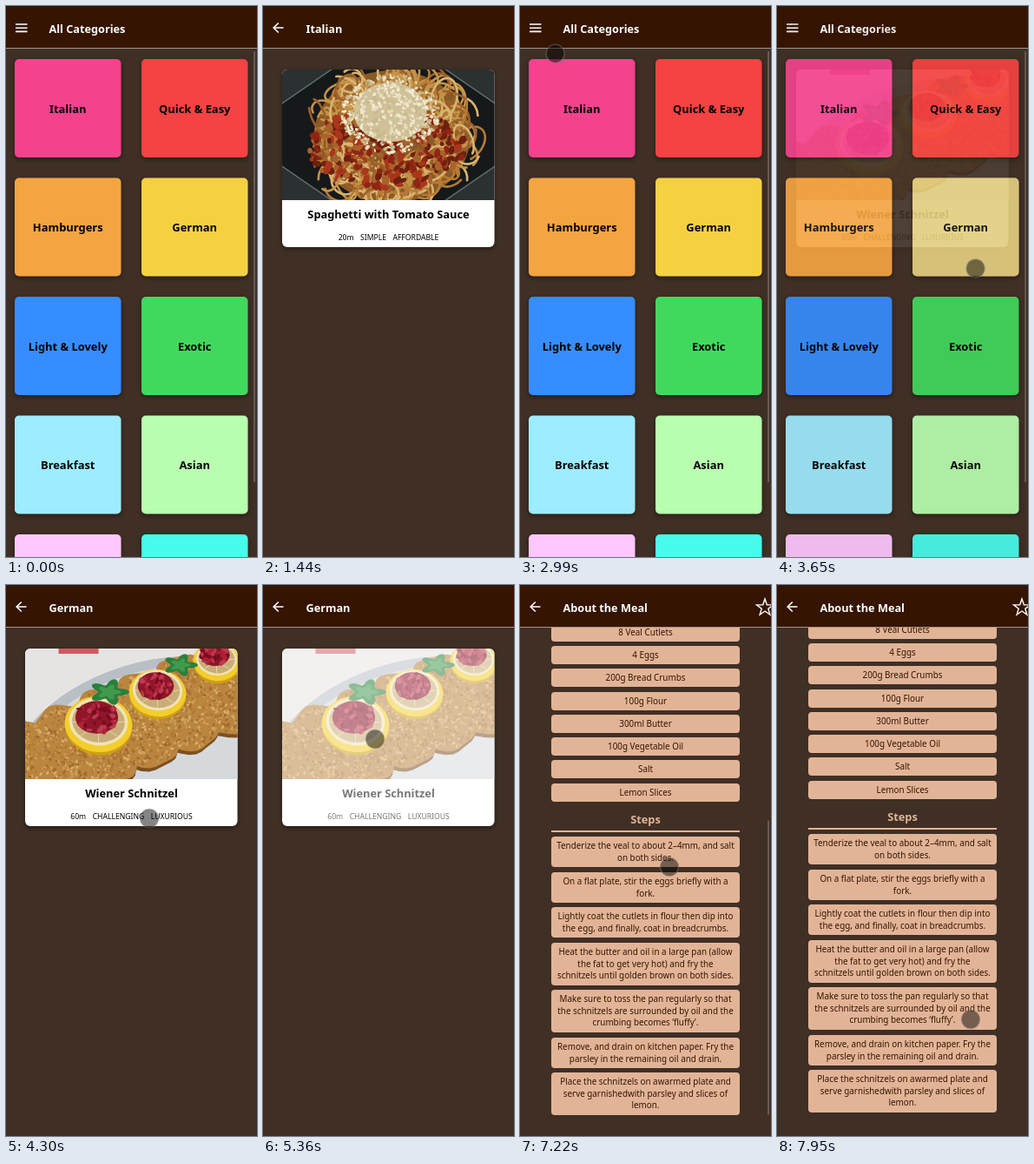
These frames come from a looping animation (289x633 px, 8 s). An HTML page with a canvas:

```html
<!DOCTYPE html>
<html lang="en">
<head>
<meta charset="utf-8">
<title>Recipe app walkthrough</title>
<style>
html, body { margin: 0; width: 100%; height: 100%; overflow: hidden; background: #3f2f25; }
canvas { display: block; width: 289px; height: 633px; }
</style>
</head>
<body>
<canvas id="stage" width="289" height="633"></canvas>
<script>
const W = 289, H = 633, MID = W / 2, LOOP = 8000, FADE = 270;
const HEADER = 49, VIEW = 561, SCROLL_END = 371;
const BG = '#3f2f25', DARK = '#351401', PEACH = '#e2b497';
const FAMILY = '"Noto Sans", "Open Sans", sans-serif';

const makeCanvas = (width, height) => Object.assign(document.createElement('canvas'), { width, height });
const stage = document.getElementById('stage').getContext('2d');
const layer = makeCanvas(W, H).getContext('2d');

const CATEGORIES = [
  ['Italian', '#f5428d'], ['Quick & Easy', '#f54242'],
  ['Hamburgers', '#f5a442'], ['German', '#f5d142'],
  ['Light & Lovely', '#368dff'], ['Exotic', '#41d95d'],
  ['Breakfast', '#9eecff'], ['Asian', '#b9ffb0'],
  ['French', '#ffc7ff'], ['Summer', '#47fced']
];
const SCHNITZEL_INFO = ['60m', 'CHALLENGING', 'LUXURIOUS'];
const INGREDIENTS = ['8 Veal Cutlets', '4 Eggs', '200g Bread Crumbs', '100g Flour',
  '300ml Butter', '100g Vegetable Oil', 'Salt', 'Lemon Slices'];
const STEPS = [
  ['Tenderize the veal to about 2–4mm, and salt', 'on both sides.'],
  ['On a flat plate, stir the eggs briefly with a', 'fork.'],
  ['Lightly coat the cutlets in flour then dip into', 'the egg, and finally, coat in breadcrumbs.'],
  ['Heat the butter and oil in a large pan (allow', 'the fat to get very hot) and fry the', 'schnitzels until golden brown on both sides.'],
  ['Make sure to toss the pan regularly so that', 'the schnitzels are surrounded by oil and the', 'crumbing becomes ‘fluffy’.'],
  ['Remove, and drain on kitchen paper. Fry the', 'parsley in the remaining oil and drain.'],
  ['Place the schnitzels on awarmed plate and', 'serve garnishedwith parsley and slices of', 'lemon.']
];

const ROUTE = [
  { at: 0, to: 'home' }, { at: 1100, to: 'italian' }, { at: 2650, to: 'home' },
  { at: 3640, to: 'german' }, { at: 5470, to: 'detail' }
];
// The pointer eases from stop to stop.
const STOPS = [
  { at: 70, x: 277, y: 407 }, { at: 600, x: 30, y: 39 }, { at: 850, x: 70, y: 118 },
  { at: 1640, x: 70, y: 118 }, { at: 1950, x: 189, y: 260 }, { at: 2500, x: 18, y: 26 },
  { at: 2880, x: 18, y: 26 }, { at: 3420, x: 225, y: 288 }, { at: 4150, x: 240, y: 345 },
  { at: 4300, x: 165, y: 268 }, { at: 4620, x: 129, y: 177 }, { at: 5850, x: 129, y: 177 },
  { at: 6330, x: 172, y: 554 }, { at: 6640, x: 172, y: 476 }, { at: 7280, x: 172, y: 320 },
  { at: 7730, x: 172, y: 320 }, { at: 7950, x: 223, y: 499 }
];
// While the page is flung, the picture only refreshes at these times.
const REFRESHES = [6640, 6760, 6890, 7220, 7280];

const clamp = v => Math.max(0, Math.min(1, v));
const progress = (t, from, to) => clamp((t - from) / (to - from));
const smooth = p => p * p * (3 - 2 * p);
const easeOut = p => 1 - (1 - p) ** 2;
const between = (t, a, b) => t >= a && t < b;

const scrollAt = t =>
  78 * smooth(progress(t, 6330, 6640)) + (SCROLL_END - 78) * easeOut(progress(t, 6640, 7280));

function seeded(seed) {
  return () => (seed = (seed * 16807) % 2147483647) / 2147483647;
}

function text(c, str, x, y, size, weight = 400, color = '#000', align = 'center') {
  c.font = `${weight} ${size}px ${FAMILY}`;
  c.fillStyle = color;
  c.textAlign = align;
  c.fillText(str, x, y);
}

function box(c, x, y, w, h, r, color) {
  c.beginPath();
  c.roundRect(x, y, w, h, r);
  c.fillStyle = color;
  c.fill();
}

function raisedBox(c, ...args) {
  c.save();
  c.shadowColor = 'rgba(0,0,0,.4)';
  c.shadowBlur = 5;
  c.shadowOffsetY = 2;
  box(c, ...args);
  c.restore();
}

function oval(c, x, y, rx, ry, color, turn = 0) {
  c.beginPath();
  c.ellipse(x, y, rx, ry, turn, 0, Math.PI * 2);
  c.fillStyle = color;
  c.fill();
}

// Closed outline with the radius given by a function of the angle
function outline(c, x, y, rx, ry, count, radius, turn = 0) {
  c.beginPath();
  for (let i = 0; i < count; i++) {
    const a = turn + i / count * Math.PI * 2, r = radius(a, i);
    c.lineTo(x + Math.cos(a) * rx * r, y + Math.sin(a) * ry * r);
  }
  c.closePath();
}

function speckle(c, rand, count, x, y, rx, ry, size, colors) {
  for (let i = 0; i < count; i++) {
    const a = rand() * 6.283, d = Math.sqrt(rand());
    oval(c, x + Math.cos(a) * rx * d, y + Math.sin(a) * ry * d,
      size * (.5 + rand()), size * (.4 + rand() * .6), colors[i % colors.length], rand() * 3);
  }
}

// Food pictures are drawn around their centre.
function pasta(c) {
  const rand = seeded(71);
  c.fillStyle = '#2b3032';
  c.fillRect(-125, -85, 250, 170);
  outline(c, 0, 0, 134, 92, 8, () => 1, Math.PI / 8);
  c.fillStyle = '#15191b';
  c.fill();
  c.strokeStyle = '#626b6c';
  c.lineWidth = 1.5;
  c.stroke();
  oval(c, 4, 2, 90, 76, '#8a5a26');
  c.lineCap = 'round';
  for (let i = 0; i < 210; i++) {
    const a = rand() * 6.283, d = .5 + rand() * .5;
    c.beginPath();
    c.ellipse(4 + Math.cos(a) * 92 * d, 2 + Math.sin(a) * 78 * d,
      9 + rand() * 15, 6 + rand() * 12, rand() * 3, rand() * 5, 5 + rand() * 4);
    c.strokeStyle = ['#c59347', '#d9b470', '#9b602b', '#b87b35'][i % 4];
    c.lineWidth = 2.6;
    c.stroke();
  }
  speckle(c, rand, 330, -2, 16, 90, 46, 4.5, ['#8f2412', '#a9361b', '#6d2010', '#a8622c']);
  oval(c, 2, -26, 42, 34, '#d0c198');
  speckle(c, rand, 420, 2, -24, 56, 45, 2.2, ['#e6dcbd', '#c9b98c', '#f1ead2']);
}

function parsley(c, x, y, size) {
  for (const [scale, color] of [[1, '#28803c'], [.6, '#409a4b']]) {
    outline(c, x, y, size * scale, size * .65 * scale, 40, a => .78 + .25 * Math.cos(5 * a));
    c.fillStyle = color;
    c.fill();
  }
}

function lemon(c, rand, x, y, r) {
  oval(c, x, y + 2, r, r * .86, '#cfa010', .1);
  oval(c, x, y, r, r * .82, '#f3cd2d', .1);
  oval(c, x, y - 3, r * .87, r * .7, '#efe3ba', .1);
  oval(c, x, y - 3, r * .78, r * .61, '#c9ad78', .1);
  for (let a = 0; a < 6.28; a += .785) {
    c.beginPath();
    c.moveTo(x, y);
    c.lineTo(x + Math.cos(a) * r * .78, y - 3 + Math.sin(a) * r * .6);
    c.strokeStyle = '#e6d3a0';
    c.lineWidth = 1;
    c.stroke();
  }
  oval(c, x - 2, y - 8, r * .63, r * .48, '#8f162a');
  speckle(c, rand, 45, x - 2, y - 8, r * .6, r * .46, 3, ['#b02038', '#780d20', '#bd3a4e']);
}

function schnitzel(c) {
  const rand = seeded(29);
  c.fillStyle = '#e6e4e3';
  c.fillRect(-125, -85, 250, 170);
  c.fillStyle = '#cf5962';
  c.fillRect(-84, -85, 46, 16);
  oval(c, 20, 40, 165, 99, '#b9bfc6', -.3);
  oval(c, 24, 43, 157, 92, '#d6d9dc', -.3);
  for (let i = 4; i >= 0; i--) {
    const x = -98 + i * 46, y = 54 - i * 19;
    c.save();
    c.translate(x, y);
    c.rotate(.5);
    outline(c, 1, 4, 64, 38, 40, a => 1 + .03 * Math.sin(7 * a + i));
    c.fillStyle = '#7d5022';
    c.fill();
    outline(c, 0, 0, 64, 38, 40, a => 1 + .03 * Math.sin(7 * a + i));
    c.fillStyle = '#b9853f';
    c.fill();
    speckle(c, rand, 420, 0, 0, 61, 35, 1.8, ['#cb9c54', '#a26a2e', '#d6ab68', '#b07636']);
    c.restore();
  }
  for (let i = 2; i >= 0; i--) lemon(c, rand, -38 + i * 68, 12 - i * 36, 39 - i * 6);
  parsley(c, -26, -25, 23);
  parsley(c, 56, -56, 20);
}

function picture(draw, w, h, scale) {
  const canvas = makeCanvas(w, h), c = canvas.getContext('2d');
  c.translate(w / 2, h / 2);
  c.scale(scale, scale);
  draw(c);
  return canvas;
}
const pastaCard = picture(pasta, 245, 150, 1);
const schnitzelCard = picture(schnitzel, 245, 150, 1);
const schnitzelLarge = picture(schnitzel, W, 266, 1.66);

function header(c, title, icon) {
  c.fillStyle = DARK;
  c.fillRect(0, 0, W, 48);
  c.fillStyle = '#241d19';
  c.fillRect(0, 0, W, 1);
  c.fillStyle = '#a5948c';
  c.fillRect(0, 48, W, 1);
  text(c, title, 49.5, 31, 12.7, 600, '#fff', 'left');
  c.strokeStyle = '#fff';
  c.lineWidth = 1.6;
  c.beginPath();
  if (icon === 'menu') {
    for (let y = 21; y < 30; y += 4.2) { c.moveTo(11, y); c.lineTo(24.5, y); }
  } else {
    c.moveTo(23.5, 25); c.lineTo(12.5, 25);
    c.moveTo(17.8, 19.5); c.lineTo(12.2, 25); c.lineTo(17.8, 30.5);
  }
  c.stroke();
}

function scrollbar(c, y, h, alpha = 1) {
  c.fillStyle = `rgba(145,135,130,${.5 * alpha})`;
  c.fillRect(285, y, 2, h);
}

function info(c, parts, y, color) {
  const gap = 7.5;
  c.font = `400 8.6px ${FAMILY}`;
  const widths = parts.map(p => c.measureText(p).width);
  let x = MID - (widths.reduce((a, b) => a + b) + gap * (parts.length - 1)) / 2;
  parts.forEach((p, i) => {
    text(c, p, x, y, 8.6, 400, color, 'left');
    x += widths[i] + gap;
  });
}

function home(c, t) {
  const pressed = between(t, 930, 1300) ? 'Italian' : between(t, 3450, 3850) ? 'German' : '';
  CATEGORIES.forEach(([name, color], i) => {
    const tile = [10 + (i % 2) * 146, 61 + Math.floor(i / 2) * 136.5, 122.5, 113, 5];
    raisedBox(c, ...tile, color);
    if (name === pressed) box(c, ...tile, 'rgba(204,204,204,.45)');
    text(c, name, tile[0] + 61.2, tile[1] + 61.5, 12.9, 700);
  });
  scrollbar(c, 52, 495);
  header(c, 'All Categories', 'menu');
}

function mealList(c, title, photo, meal, parts, pressed) {
  const card = [22, 73, 244.5, 204, 6];
  raisedBox(c, ...card, '#fff');
  c.save();
  c.beginPath();
  c.roundRect(...card);
  c.clip();
  c.globalAlpha = pressed ? .53 : 1;
  c.drawImage(photo, 22, 73);
  text(c, meal, MID, 244, 12.8, 700);
  info(c, parts, 269, '#000');
  c.restore();
  header(c, title, 'back');
}

function heading(c, label, y) {
  text(c, label, MID, y, 12.8, 700, PEACH);
  c.fillStyle = PEACH;
  c.fillRect(36, y + 8, 217, 2);
}

function star(c, x, y) {
  outline(c, x, y, 10, 10, 10, (a, i) => i % 2 ? .4 : 1, -Math.PI / 2);
  c.strokeStyle = '#fff';
  c.lineWidth = 1.4;
  c.stroke();
}

function itemBox(c, lines, y, h, baseline) {
  box(c, 36, Math.round(y), 217, Math.round(h), 4, PEACH);
  lines.forEach((line, i) => text(c, line, MID, Math.round(y) + baseline + i * 13.6, 9.85, 400, DARK));
}

function detail(c, t) {
  const scroll = scrollAt(t), content = VIEW + SCROLL_END;
  c.save();
  c.beginPath();
  c.rect(0, HEADER, W, VIEW);
  c.clip();
  c.translate(0, -Math.round(scroll));
  c.drawImage(schnitzelLarge, 0, HEADER);
  text(c, 'Wiener Schnitzel', MID, 340, 17.2, 700, '#fff');
  info(c, SCHNITZEL_INFO, 366, '#fff');
  heading(c, 'Ingredients', 396);
  INGREDIENTS.forEach((item, i) => itemBox(c, [item], 411.8 + i * 26.25, 21, 14));
  heading(c, 'Steps', 642);
  let y = 657.2;
  for (const lines of STEPS) {
    const h = 7.5 + lines.length * 13.8;
    itemBox(c, lines, y, h, 14.2);
    y += h + 5.45;
  }
  c.restore();
  scrollbar(c, HEADER + scroll * VIEW / content, VIEW * VIEW / content, 1 - progress(t, 7700, 7930));
  header(c, 'About the Meal', 'back');
  star(c, 282, 26);
}

const SCREENS = {
  home,
  italian: c => mealList(c, 'Italian', pastaCard, 'Spaghetti with Tomato Sauce', ['20m', 'SIMPLE', 'AFFORDABLE']),
  german: (c, t) => mealList(c, 'German', schnitzelCard, 'Wiener Schnitzel', SCHNITZEL_INFO, t > 4930),
  detail
};

function paint(c, name, t) {
  c.fillStyle = BG;
  c.fillRect(0, 0, W, H);
  SCREENS[name](c, t);
}

function pointer(c, t) {
  const next = STOPS.findIndex(s => s.at > t);
  const b = STOPS[next < 0 ? STOPS.length - 1 : next];
  const a = next > 0 ? STOPS[next - 1] : b;
  const p = a === b ? 1 : smooth(progress(t, a.at, b.at));
  c.save();
  c.globalAlpha = progress(t, 60, 130) * (1 - progress(t, 1320, 1430) + progress(t, 1640, 1710));
  oval(c, a.x + (b.x - a.x) * p, a.y + (b.y - a.y) * p, 10.5, 10.5, 'rgba(0,0,0,.48)');
  c.strokeStyle = 'rgba(125,115,110,.45)';
  c.lineWidth = 1.5;
  c.stroke();
  c.restore();
}

function render(time) {
  let t = time % LOOP;
  if (between(t, REFRESHES[0], 7610)) t = REFRESHES.filter(r => r <= t).pop();
  const index = ROUTE.filter(r => r.at <= t).length - 1;
  const { at, to } = ROUTE[index];
  const p = progress(t, at, at + FADE);
  if (index > 0 && p < 1) {
    paint(stage, ROUTE[index - 1].to, t);
    paint(layer, to, t);
    stage.globalAlpha = easeOut(p);
    stage.drawImage(layer.canvas, 0, 0);
    stage.globalAlpha = 1;
  } else {
    paint(stage, to, t);
  }
  pointer(stage, t);
}

const start = performance.now();
function tick() {
  render(performance.now() - start);
  requestAnimationFrame(tick);
}
tick();
</script>
</body>
</html>
```
